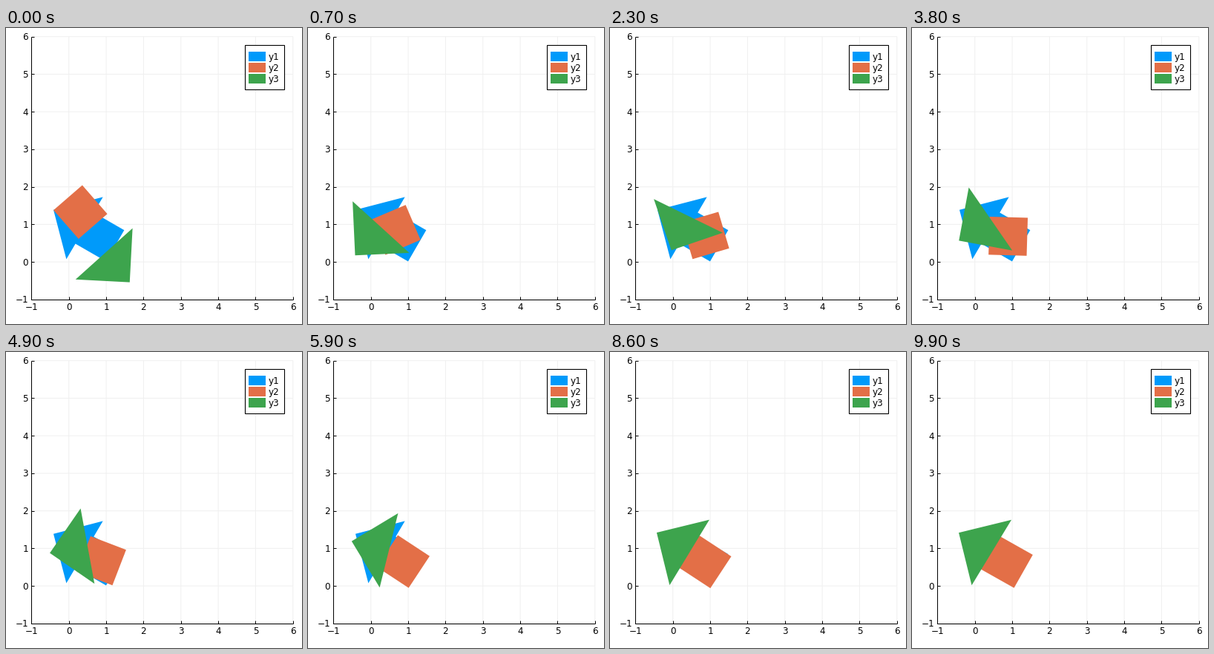
A matplotlib script for the animation above (10000 ms loop, 399 by 400 pixels).

```python
import numpy as np
import matplotlib.pyplot as plt
from matplotlib.animation import FuncAnimation
from matplotlib.patches import Polygon, Rectangle

W, H, DPI = 399, 400, 64
PX = 72 / DPI  # points per pixel
FRAMES, INTERVAL = 100, 100
BLUE, ORANGE, GREEN = "#009afa", "#e36f47", "#3da44d"
LEFT, RIGHT, TOP, BOTTOM = 34.4, 386.8, 11.7, 366.9
TICK = 4

plt.rcParams["font.family"] = "DejaVu Sans"
fig = plt.figure(figsize=(W / DPI, H / DPI), dpi=DPI, facecolor="white")
ax = fig.add_axes([0, 0, 1, 1])
ax.set_xlim(0, W)
ax.set_ylim(H, 0)
ax.set_axis_off()


def line(x, y, color="black", z=1, snap=True):
    ax.plot(x, y, color=color, lw=PX, zorder=z, snap=snap,
            solid_capstyle="butt")


def label(x, y, text, ha):
    ax.text(x, y + 4.4, text, size=12 * PX, ha=ha, va="baseline", zorder=9)


def draw_axes():
    for v in range(-1, 7):
        x = LEFT + (v + 1) * (RIGHT - LEFT) / 7
        y = BOTTOM - (v + 1) * (BOTTOM - TOP) / 7
        line([x, x], [TOP, BOTTOM], "#f0f0f0", 0, False)
        line([LEFT, RIGHT], [y, y], "#f0f0f0", 0, False)
        line([x, x], [BOTTOM - TICK, BOTTOM])
        line([LEFT, LEFT + TICK], [y, y])
        text = str(v).replace("-", "\u2212")
        label(x, 376.7, text, "center")
        label(30, y, text, "right")
    line([LEFT, LEFT], [TOP, BOTTOM])
    line([LEFT, RIGHT], [BOTTOM, BOTTOM])


def draw_legend():
    ax.add_patch(Rectangle((322.4, 22.9), 53, 60, fc="white", ec="black",
                           lw=1.1 * PX, zorder=7))
    for i, color in enumerate((BLUE, ORANGE, GREEN)):
        y = 39 + 15 * i
        ax.add_patch(Rectangle((327, y - 7), 23.4, 13, fc=color, lw=0, zorder=8))
        label(354, y, f"y{i + 1}", "left")


# Right isosceles triangle around its centroid, square around its centre.
TRIANGLE = np.array([(-2 / 3, 0), (1 / 3, 1), (1 / 3, -1)])
SQUARE = np.array([(-1, -1), (1, -1), (1, 1), (-1, 1)])


def place(shape, size, x, y, angle):
    """Scale a shape (y up), rotate it by degrees, move it to pixel (x, y)."""
    a = np.radians(angle)
    c, s = np.cos(a), np.sin(a)
    px, py = size * shape.T
    return np.column_stack([x + px * c - py * s, y - px * s - py * c])


def add_shape(points, color, z):
    return ax.add_patch(Polygon(points, fc=color, lw=0, zorder=z))


def decay(t, life):
    return np.exp(-t / life)


def settle(t, end):
    """Cosine ease from 1 to 0 between step 20 and the end step."""
    return 0.5 + 0.5 * np.cos(np.pi * np.clip((t - 20) / (end - 20), 0, 1))


t = np.arange(FRAMES)
swing = decay(t, 10) * np.cos(2 * np.pi * t / 24)
slow, fast = settle(t, 75), settle(t, 65)

# Each pose (x, y, angle) is a resting value plus offsets that die out.
triangle_path = np.column_stack([
    92.3 + 51.4 * swing,
    262.2 + 7.2 * slow + 48.6 * decay(t, 5),
    -31 + 89 * slow + 74 * swing,
])
square_path = np.column_stack([
    127.8 + 2.5 * slow - 30 * decay(t, 8),
    283.7 - 3.7 * slow - 31.3 * decay(t, 5),
    -36 + 53 * fast + 24 * decay(t, 5) + 6.4 * (t / t[-1]) ** 6,
])

# The search jitters around that course, less and less.
rng = np.random.default_rng(4)
jitter = np.where(t > 0, 0.2 + 1.2 * decay(t, 30), 0)[:, None]
for path in (triangle_path, square_path):
    path += jitter * rng.uniform(-1, 1, path.shape)

draw_axes()
draw_legend()
add_shape(place(TRIANGLE, 48.7, 92, 262.2, -30.4), BLUE, 3)
add_shape(place(SQUARE, 24.4, 126, 282.1, -30), BLUE, 3)
square = add_shape(SQUARE, ORANGE, 4)
triangle = add_shape(TRIANGLE, GREEN, 5)


def update(i):
    square.set_xy(place(SQUARE, 25.7, *square_path[i]))
    triangle.set_xy(place(TRIANGLE, 51.7, *triangle_path[i]))
    return square, triangle


anim = FuncAnimation(fig, update, frames=FRAMES, interval=INTERVAL,
                     repeat=True, repeat_delay=0)
plt.show()
```
